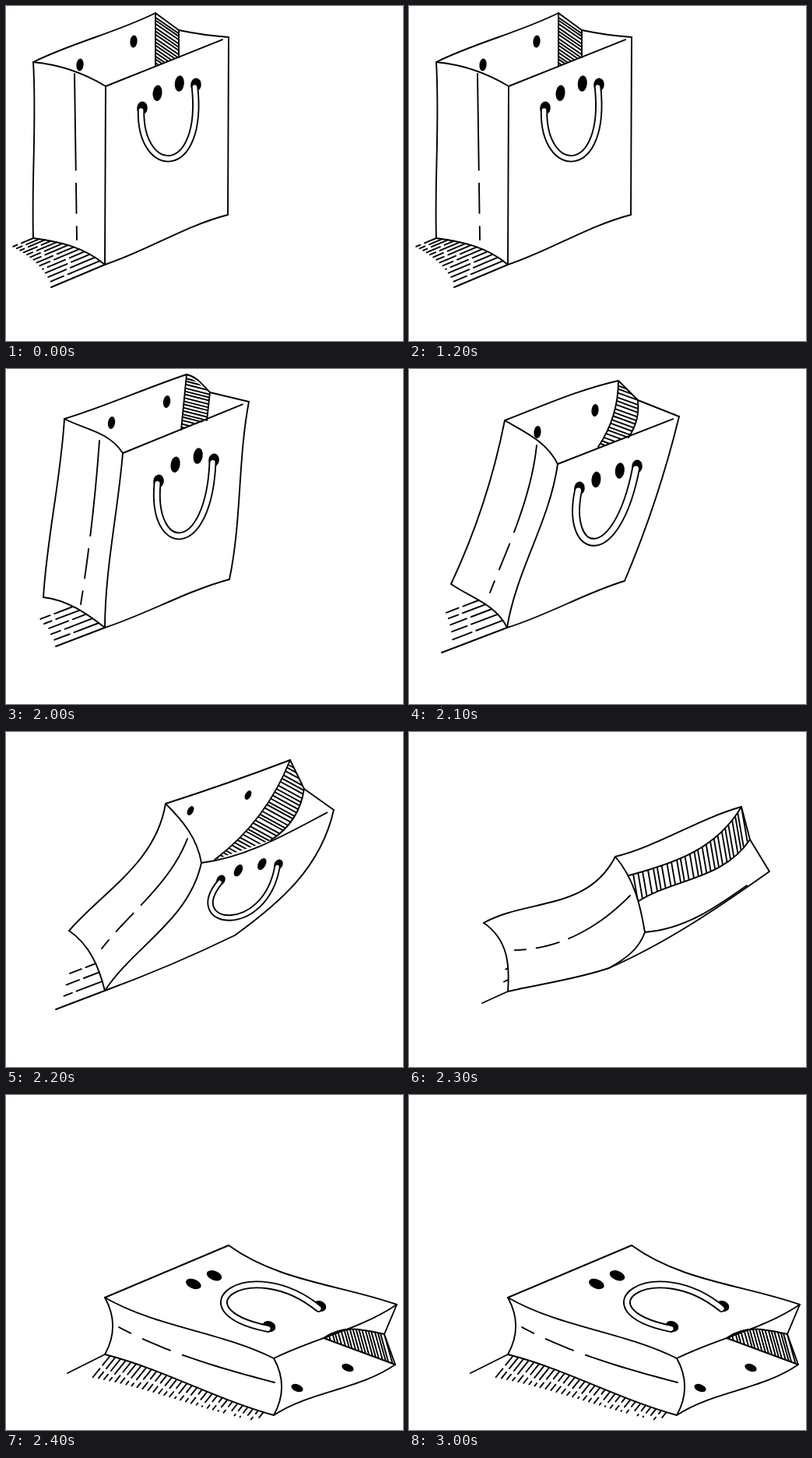
An HTML page with a canvas for the animation above (3.4 s loop, 510 px wide and 430 px high).

```html
<!DOCTYPE html>
<html lang="en">
<head>
<meta charset="utf-8">
<title>Tipping bag</title>
<style>
  html, body { margin: 0; width: 100%; height: 100%; overflow: hidden; background: #fff; }
  canvas { display: block; }
</style>
</head>
<body>
<canvas id="stage" width="510" height="430"></canvas>
<script>
const ctx = document.getElementById('stage').getContext('2d');
const INK = 1.9;

// Corners: A B C D run around the mouth from its rear left, E is the mouth's front corner,
// F G H lie on the base, K ends the front rim, M N end the inner gusset, T ends the shadow
// and P Q is the crease. An edge is named by its two corners and is straight unless bent;
// a bend is its sideways distance from the straight line at one and two thirds.
const EDGES = 'AB BC CD AE EK DF FG EG AH HG BM CN GT';

const poses = [
  {
    until: 2000,
    corners: { A: [35, 72], B: [192, 9], C: [222, 31], D: [286, 40], E: [128, 103], F: [285, 268],
      G: [127, 332], H: [35, 298], M: [192, 77], N: [222, 66], P: [88, 87], Q: [91, 300], T: [58, 361] },
    bends: { AB: [-1, 1], CD: [1, 1], AE: [-5, -5], FG: [2.5, 0], AH: [-1.5, 0], HG: [-6, -7] },
    holes: [[175, 131], [244, 101]], eyes: [-.5, -10.5], back: [-80, -55.5], turn: .1, size: 1,
    handle: [[172, 220], [255, 222]], width: 7.5,
    hatch: [15, .6], shade: [0, 13, 28, 72]
  },
  {
    until: 2100,
    corners: { A: [75, 64], B: [232, 7], C: [262, 30], D: [312, 42], E: [150, 108], F: [287, 270],
      G: [127, 332], H: [48, 293], M: [225, 78], N: [258, 66], P: [120, 92], Q: [96, 302], T: [64, 356] },
    bends: { AB: [1, 0], BC: [-3, -2], AE: [-4, -7], DF: [1, -2], FG: [2, 0], EG: [1, 3],
      AH: [-1, 1], HG: [-6, -5], PQ: [-2, -2] },
    holes: [[196, 144], [267, 117]], eyes: [1, -13.5], back: [-60.5, -75], turn: .15, size: 1,
    handle: [[186, 238], [260, 244]], width: 8,
    hatch: [17, .25], shade: [.45, 5, 45, 65]
  },
  {
    until: 2200,
    corners: { A: [123, 66], B: [269, 15], C: [294, 40], D: [347, 61], E: [191, 122], F: [277, 272],
      G: [126, 332], H: [54, 276], M: [243, 100], N: [282, 88], P: [164, 98], Q: [104, 287], T: [42, 364] },
    bends: { AB: [-2, -3], AE: [-5, -7], DF: [-4, -4], FG: [1, -1], EG: [-3, 2], AH: [-6, -6],
      HG: [-4, -7], BM: [-6, -6], CN: [-4, -4], PQ: [-7, -5] },
    holes: [[219, 153], [293, 125]], eyes: [0, -3], back: [-54, -72], turn: .1, size: 1,
    handle: [[200, 240], [266, 258]], width: 9,
    hatch: [18, .35], shade: [.45, 5, 45, 75]
  },
  {
    until: 2300,
    corners: { A: [205, 92], B: [365, 36], C: [383, 73], D: [421, 100], E: [251, 168], F: [294, 261],
      G: [127, 332], H: [81, 255], M: [268, 164], N: [340, 139], P: [233, 137], Q: [123, 278], T: [64, 356] },
    bends: { AB: [1, 1], AE: [-6, -7], EK: [8, 6], DF: [-19, -16], FG: [-2, -2], EG: [-13, -5],
      AH: [-17, -10], HG: [-8, -7], BM: [-10, -10], CN: [-8, -8], PQ: [-8, -4] },
    holes: [[276, 190], [350, 170]], eyes: [1, -6.5], back: [-39, -89], turn: .5, size: .8,
    handle: [[228, 250], [332, 264]], width: 6.5,
    hatch: [33, .5], shade: [.6, 3, 38, 60]
  },
  {
    until: 2400,
    edges: 'AB BC CD AE EK DF FG EF AH HG BM CN GT',
    corners: { A: [265, 160], B: [427, 96], C: [438, 138], D: [463, 179], E: [303, 257], F: [257, 303],
      G: [127, 333], H: [96, 245], K: [434, 197], M: [283, 184], N: [295, 217], P: [284, 210],
      Q: [136, 280], T: [94, 348] },
    bends: { AB: [2, -1], AE: [-7, -6], EK: [10, 8], DF: [-5, -6], FG: [-2, -1], EF: [-6, -5],
      AH: [-20, -9], HG: [-13, -11], BM: [-17, -14], CN: [-12, -5], PQ: [-14, -15] },
    hatch: [27, 1.4], shade: [.7, 2, 5, 14]
  },
  {
    until: 3400,
    edges: 'AB BC CD AE ED EG AH HG HF FB CM DM GT',
    corners: { A: [344, 338], B: [502, 269], C: [486, 307], D: [500, 346], E: [344, 411], F: [286, 193],
      G: [127, 333], H: [127, 260], M: [408, 312], P: [345, 369], Q: [145, 298], T: [79, 357] },
    bends: { AB: [1, 4], AE: [-9, -9], ED: [-2, 3], EG: [-1, 2], AH: [1, -4], HG: [-9, -9],
      FB: [10, 5], CM: [7, 9], PQ: [-5, -6] },
    holes: [[338, 297], [403, 271]], eyes: [-116, -47], back: [36, 79], turn: 1.95, size: 1,
    handle: [[215, 275], [314, 203]], width: 8,
    gusset: ['CM', 'DM'], hatch: [20, 1.3], base: 'EG', lean: 2.25, shade: [.06, 31, 14, 36]
  }
];

const mix = (a, b, t) => [0, 1].map(k => a[k] + (b[k] - a[k]) * t);
const add = (a, b, s = 1) => [a[0] + b[0] * s, a[1] + b[1] * s];
const unit = angle => [Math.cos(angle), Math.sin(angle)];

let seed;
const random = () => (seed = seed * 16807 % 2147483647) / 2147483647;

// Control points of the cubic from a to b with the given bend
function bent(a, b, [u, v] = [0, 0]) {
  const [dx, dy] = [b[0] - a[0], b[1] - a[1]], size = Math.hypot(dx, dy);
  const side = [-dy / size, dx / size];
  return [a, add(mix(a, b, 1 / 3), side, 3 * u - 1.5 * v), add(mix(a, b, 2 / 3), side, 3 * v - 1.5 * u), b];
}

function at(curve, t) {
  while (curve.length > 1) curve = curve.slice(1).map((p, i) => mix(curve[i], p, t));
  return curve[0];
}

const curveTo = ([, p, q, end]) => ctx.bezierCurveTo(...p, ...q, ...end);

function trace(curve) {
  ctx.beginPath();
  ctx.moveTo(...curve[0]);
  curveTo(curve);
}

function ink(curve) {
  trace(curve);
  ctx.stroke();
}

const line = (a, b) => ink(bent(a, b));

function dot([x, y], rx, ry, turn) {
  ctx.beginPath();
  ctx.ellipse(x, y, rx, ry, turn, 0, 7);
  ctx.fill();
}

// Parallel strokes starting on the left curve, kept between both curves
function hatch(left, right, [count, angle]) {
  ctx.save();
  trace(left);
  ctx.lineTo(...right[3]);
  curveTo([...right].reverse());
  ctx.clip();
  for (let i = 0; i <= count; i++) {
    const p = at(left, (i + random() * .3) / count);
    line(p, add(p, unit(angle), 100));
  }
  ctx.restore();
}

// Broken strokes running out from under the base
function shade(base, angle, [from, count, near, far]) {
  for (let i = 0; i < count; i++) {
    const u = i / count, p = at(base, from + (1 - from) * u);
    const reach = near + (far - near) * u;
    for (let s = 0; s < reach;) {
      const end = Math.min(reach, s + reach * (.3 + random() * .4));
      line(add(p, unit(angle), s), add(p, unit(angle), end));
      s = end + 6;
    }
  }
}

function drawFace({ holes, eyes, back, turn, size, handle, width }) {
  for (const hole of holes) {
    dot(hole, 6.8 * size, 8.6 * size, turn);
    dot(add(hole, back), 4.6 * size, 8 * size, turn);
  }
  for (const t of [.29, .7]) dot(add(mix(...holes, t), eyes), 6 * size, 10.3 * size, turn);
  const [start, end] = holes.map(p => add(p, [-1.5, 3]));
  trace([start, ...handle, end]);
  for (const [w, color] of [[width + INK, '#000'], [width - INK, '#fff']]) {
    ctx.lineWidth = w;
    ctx.strokeStyle = color;
    ctx.stroke();
  }
}

function drawBag(pose) {
  const c = pose.corners;
  const rim = { K: mix(c.E, c.D, .95), ...c };
  const edge = name => bent(rim[name[0]], rim[name[1]], pose.bends[name]);
  (pose.edges || EDGES).split(' ').forEach(name => ink(edge(name)));

  const crease = edge('PQ');
  for (const [from, to] of [[0, .58], [.66, .84], [.92, 1]]) {
    ctx.beginPath();
    for (let i = 0; i <= 12; i++) ctx.lineTo(...at(crease, from + (to - from) * i / 12));
    ctx.stroke();
  }

  const [left, right] = (pose.gusset || ['BM', 'CN']).map(edge);
  hatch(left, right, pose.hatch);
  const fall = Math.atan2(c.T[1] - c.G[1], c.T[0] - c.G[0]);
  shade(edge(pose.base || 'HG'), pose.lean || fall, pose.shade);
  if (pose.holes) drawFace(pose);
}

const start = performance.now();

function draw() {
  const time = Math.max(0, performance.now() - start) % 3400;
  seed = 7;
  ctx.fillStyle = '#fff';
  ctx.fillRect(0, 0, 510, 430);
  ctx.fillStyle = ctx.strokeStyle = '#000';
  ctx.lineWidth = INK;
  ctx.lineCap = ctx.lineJoin = 'round';
  drawBag(poses.find(pose => time < pose.until));
  requestAnimationFrame(draw);
}
draw();
</script>
</body>
</html>
```
